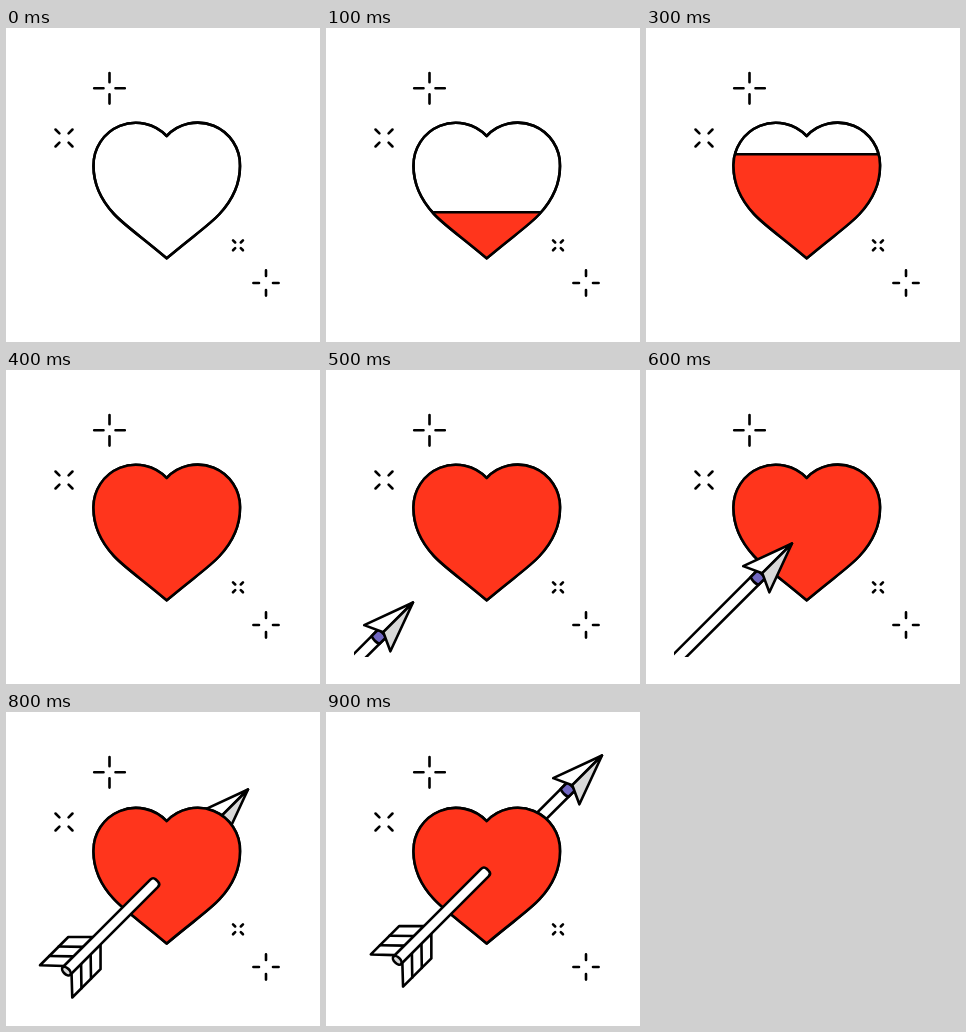
These frames come from a looping animation (314x314 px, 1 s). An HTML page:

```html
<!DOCTYPE html>
<html lang="en">
<head>
<meta charset="utf-8">
<title>Heart and arrow</title>
<style>
html, body { margin: 0; width: 100%; height: 100%; overflow: hidden; background: #fff; }
svg { display: block; width: 100vw; height: 100vh; }
.ink { stroke: #000; stroke-width: 2.6; stroke-linecap: round; stroke-linejoin: round; fill: none; }
.ink .white { fill: #fff; }
.ink .grey { fill: #d9d9d9; }
.ink .purple { fill: #7167c2; }
.ink .red { fill: #ff351c; }
</style>
</head>
<body>
<svg viewBox="0 0 314 314">
  <defs>
    <path id="outline" d="M160.7 108A42.4 42.4 0 0 0 87.5 138C87.5 155 95 172 108 186C118 197 137 210 160.7 230.3C184.5 210 203.5 197 213.5 186C226.5 172 234 155 234 138A42.4 42.4 0 0 0 160.7 108Z"/>
    <clipPath id="inside"><use href="#outline"/></clipPath>
    <clipPath id="frame"><rect x="28" y="28" width="258" height="259"/></clipPath>
    <g id="head">
      <path class="white" id="rod"/>
      <path class="purple" d="M-43-5.5H-53Q-55 0-53 5.5H-43Z"/>
      <path class="white" d="M0 0L-50.5-18.5L-42 0Z"/>
      <path class="grey" d="M0 0L-50.5 18.5L-42 0Z"/>
    </g>
    <g id="fin">
      <path class="purple" d="M-85-5.3L-102.5-22.8H-142.5L-126-5.3Z"/>
      <path d="M-99-5.3L-116-22.8M-112.5-5.3L-129.5-22.8"/>
    </g>
  </defs>
  <g class="ink">
    <g id="sparkles"></g>
    <g id="behind" clip-path="url(#frame)"></g>
    <g id="heart">
      <use href="#outline" class="white"/>
      <g clip-path="url(#inside)"><rect id="level" class="red" x="70" width="180" height="250"/></g>
      <use href="#outline"/>
    </g>
    <g id="front" clip-path="url(#frame)">
      <g id="tail">
        <use href="#fin"/>
        <use href="#fin" transform="scale(1 -1)"/>
        <path class="white" d="M-128-5.3H-4Q0-5.3 0-1.5V1.5Q0 5.3-4 5.3H-128Z"/>
        <ellipse class="grey" cx="-128" rx="3" ry="5.3"/>
      </g>
    </g>
  </g>
</svg>
<script>
const el = id => document.getElementById(id);
const show = (node, on) => node.setAttribute('visibility', on ? 'visible' : 'hidden');
const AXIS = 319.5; // the arrow slides along x + y = AXIS
const place = (node, x) =>
  node.setAttribute('transform', `translate(${x} ${AXIS - x}) rotate(-45)`);

// x, y, inner radius, outer radius, rotation
const sparkles = [[103.5, 60.3, 6, 15.3, 0], [58, 110, 6.5, 12, 45],
                  [260, 255, 7, 12.6, 0], [232, 217.3, 4, 7, 45]];
el('sparkles').innerHTML = sparkles.map(([x, y, a, b, turn]) =>
  `<path transform="translate(${x} ${y}) rotate(${turn})" d="M${a} 0H${b}M${-a} 0H${-b}M0 ${a}V${b}M0 ${-a}V${-b}"/>`
).join('');

const head = el('head');
el('front').append(head);

function draw(now) {
  const step = Math.floor(now % 1000 / 100);
  const through = step >= 7;

  const level = step < 1 ? 250 : step < 4 ? 213.2 - 29 * step : 80;
  el('level').setAttribute('y', level);
  el('heart').setAttribute('transform', `translate(0 ${through ? 1.2 : 0})`);

  // the head enters over the heart, then leaves from behind it
  const layer = el(through ? 'behind' : 'front');
  if (head.parentNode !== layer) layer.append(head);
  const rod = through ? -110 : -260;
  el('rod').setAttribute('d', `M-45-5.5H${rod}V5.5H-45Z`);
  place(head, through ? 276 - 34 * (9 - step) : 146 - 59 * (6 - step));
  show(head, step >= 5);

  place(el('tail'), 161.7 - 10.8 * (9 - step));
  show(el('tail'), through);
  requestAnimationFrame(draw);
}
draw(performance.now());
</script>
</body>
</html>
```
